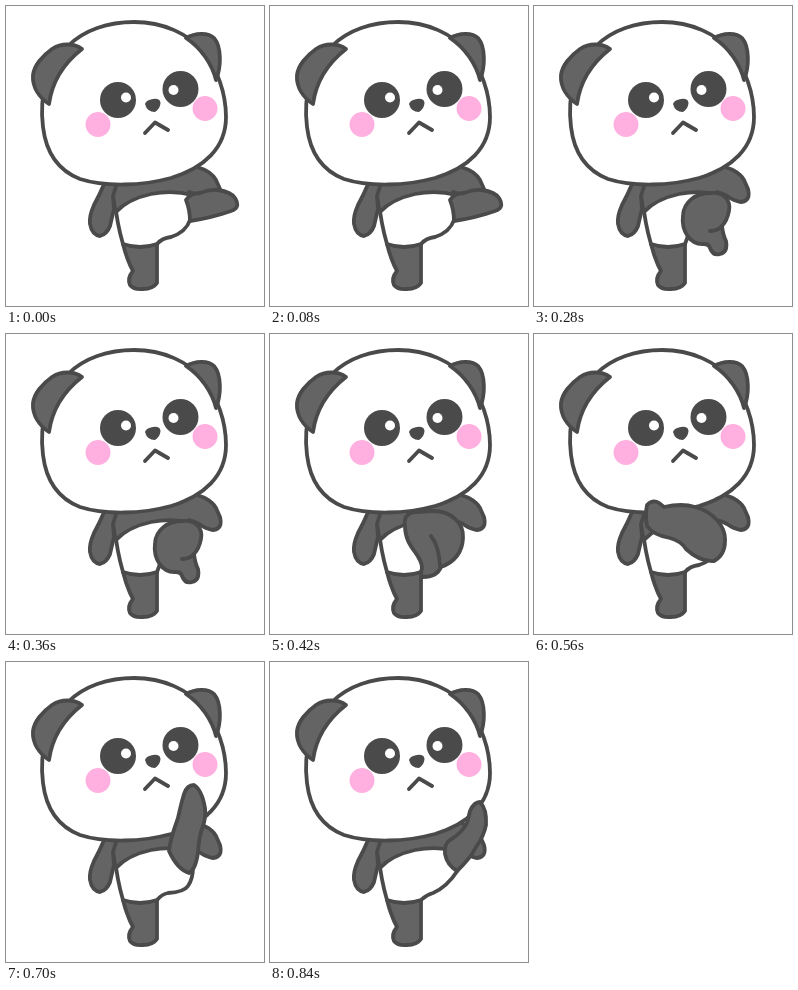
These frames come from a looping animation (258x300 px, 0.98 s). An HTML page:

```html
<!DOCTYPE html>
<html lang="en">
<head>
<meta charset="utf-8">
<title>Kicking panda</title>
<style>
  html, body { margin: 0; width: 100%; height: 100%; overflow: hidden; background: #fff; }
  svg { display: block; width: 100vw; height: 100vh; }
  .dark, .white, .line { stroke: #4b4a4b; stroke-width: 3.8; stroke-linejoin: round; stroke-linecap: round; }
  .dark { fill: #656465; }
  .white { fill: #fff; }
  .line { fill: none; }
  .eye { fill: #4b4a4b; }
  .shine { fill: #fff; }
  .cheek { fill: #ffb0e0; }
</style>
</head>
<body>
<svg viewBox="0 0 258 300">
  <!-- standing leg -->
  <path class="dark" d="M117 238 Q121 254 127 265 Q121 272 124 279 Q128 284 137 283 Q147 283 151 277 L151 238Z"/>
  <path class="white" id="belly"/>
  <!-- chest and arms -->
  <path class="dark" d="M104 172 L107 190 Q108 199 110 206 Q122 193 145 188 Q167 184 186 189 L188 164Z"/>
  <path class="dark" d="M183 163 L191 161 Q205 165 210 174 L214 183 Q217 195 207 196 Q200 195 193 190 Q188 187 183 186"/>
  <path class="dark" d="M99 176 Q94 188 88 199 Q83 210 84 218 Q86 229 94 230 Q101 228 104 220 Q107 207 108 203 L107 190 L112 174Z"/>
  <!-- head -->
  <path class="white" d="M62 40 C78 24 102 16 128 16 C158 16 182 28 197 45 C211 62 220 87 220 111 C220 142 198 162 165 172 C136 180 99 181 74 173 C51 164 40 146 37 121 C33 88 41 61 62 40Z"/>
  <path class="dark" d="M76 43 C68 37 55 37 46 43 C36 50 28 60 27 69 C26 82 34 92 43 98 C46 76 58 57 76 43Z"/>
  <path class="dark" d="M180 32 C189 27 202 26 208 32 C216 41 215 62 210 74 C206 58 195 42 180 32Z"/>
  <circle class="cheek" cx="92" cy="118.500" r="12.500"/>
  <circle class="cheek" cx="199" cy="102.500" r="12.500"/>
  <circle class="eye" cx="112" cy="94" r="18"/>
  <circle class="eye" cx="174.500" cy="83" r="18"/>
  <circle class="shine" cx="120" cy="91.500" r="5"/>
  <circle class="shine" cx="167.500" cy="84" r="5"/>
  <path class="eye" d="M139 98 Q140 94 147 93 Q154 92 154.500 97 Q154 103 149 106 Q141 106 139 98Z"/>
  <path class="line" d="M139 127 L149 116.500 L162 124"/>
  <!-- kicking leg -->
  <path class="dark" id="leg"/>
  <path class="line" id="crease"/>
</svg>
<script>
const STEP = 140;
const hipOut = 'Q156 232 165 231 Q180 226 184 214 L186 190';
const hipBent = 'L154 230 L170 218 L186 190';
const hipUp = 'Q156 232 162 231 Q178 230 182 224 Q187 217 187 205 L186 190';

const poses = [
  { hip: hipOut,
    leg: 'M180 194 Q184 187 194 187 Q204 183 212 184 Q225 186 229 192 Q235 202 225 205 Q205 212 184 215 Q184 204 180 194Z' },
  { hip: 'Q156 230 167 229 Q175 229 179 233 L197 212 Q190 198 186 189',
    leg: 'M174 230 Q188 226 196 212 Q198 223 207 229 Q220 237 219 245 Q216 255 208 255 Q202 253 195 246 Q187 235 174 230Z' },
  { hip: hipBent,
    leg: 'M149 209 C150 196 161 187 177 187 C190 186 197 194 195 205 Q193 215 188 220 Q189 229 192 235 Q194 246 186 248 Q179 250 176 242 Q175 238 170 238 C156 239 147 225 149 209Z',
    crease: 'M176 225 Q184 225 188 220' },
  { hip: hipBent,
    leg: 'M135 192 Q133 179 146 178 L163 177 C181 177 194 189 193 204 Q192 225 171 233 Q167 243 153 243 Q150 242 152 234 C152 220 135 214 135 192Z',
    crease: 'M161 202 Q169 212 170 232' },
  { hip: hipOut,
    leg: 'M113 171 Q119 165 125 169 L130 173 Q148 169 161 173 C180 178 192 193 191 207 Q191 221 180 227 Q166 228 152 215 Q147 207 136 204 Q119 201 113 192 Q111 181 113 171Z' },
  { hip: hipUp,
    leg: 'M178 132 Q181 123 188 123 Q196 128 199 146 Q200 155 197 164 Q193 174 192 190 Q190 207 183 211 Q171 207 163 189 Q164 178 172 156 Q175 142 178 132Z' },
  { hip: 'Q156 233 163 231 Q177 225 188 208 L186 190',
    leg: 'M200 149 Q204 140 210 140 Q217 147 216 163 Q214 174 206 185 Q200 197 187 209 Q177 203 175 192 Q174 182 180 178 Q192 171 197 161 Z' }
];

const [belly, leg, crease] = ['belly', 'leg', 'crease'].map(id => document.getElementById(id));

function draw() {
  const pose = poses[Math.floor(performance.now() / STEP) % poses.length];
  belly.setAttribute('d', `M108 190 Q111 218 117 238 Q134 244 151 238 ${pose.hip} L180 170 L108 170Z`);
  leg.setAttribute('d', pose.leg);
  crease.setAttribute('d', pose.crease || '');
  requestAnimationFrame(draw);
}
draw();
</script>
</body>
</html>
```
